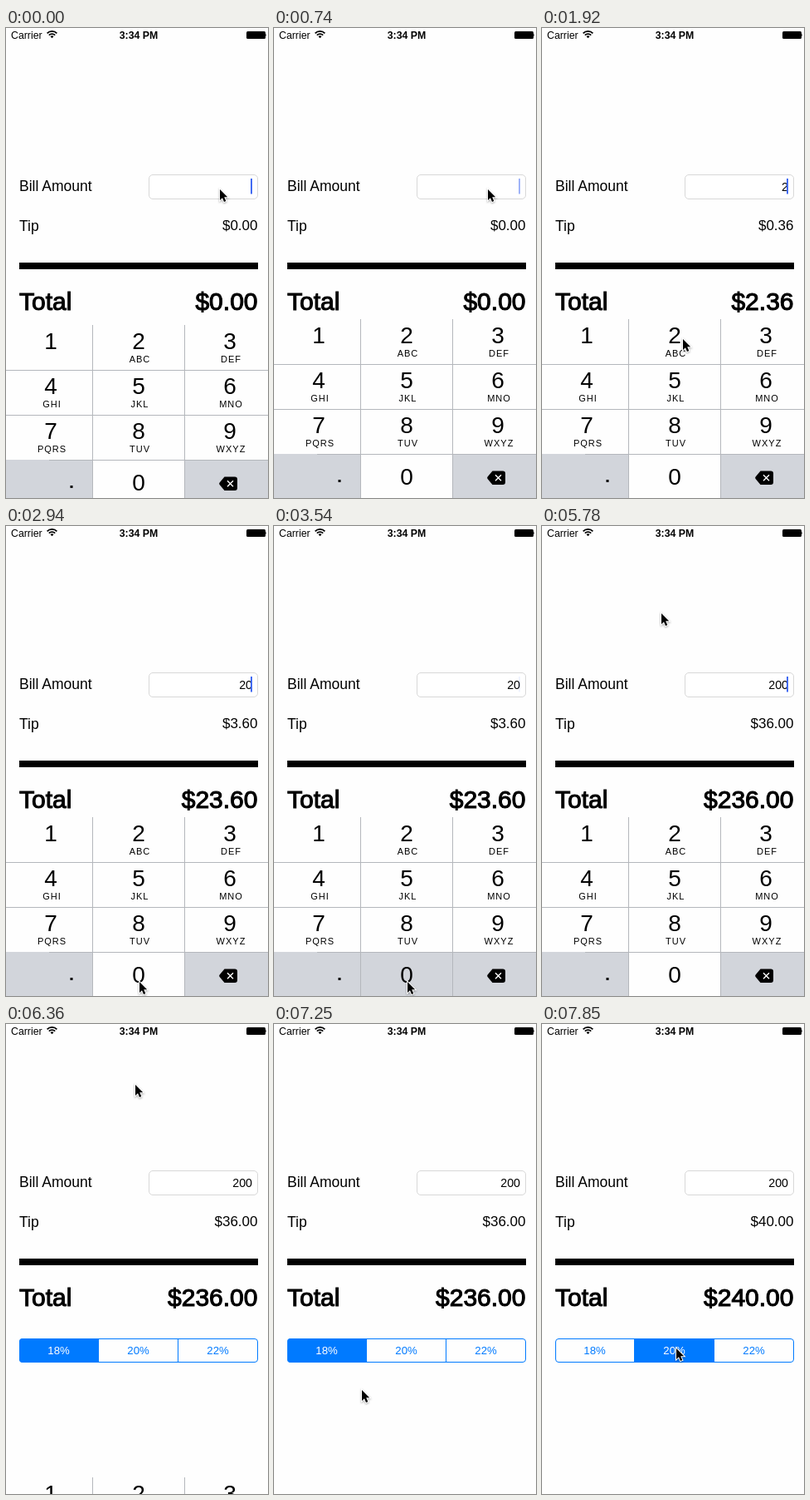
An HTML page that plays this animation: 316 by 565 pixels, repeating every 8 s.

```html
<!DOCTYPE html>
<html lang="en">
<head>
<meta charset="utf-8">
<title>Tip calculator</title>
<style>
  html, body { margin: 0; width: 100%; height: 100%; overflow: hidden; background: #fefefe; }
  svg { display: block; width: 100%; height: 100%; font-family: "Liberation Sans", Arial, sans-serif; }
  .label { font-size: 17.5px; }
  .money { font-size: 17px; text-anchor: end; }
  .total { font-size: 30px; stroke: #000; stroke-width: 1.1; }
  .end { text-anchor: end; }
  .status { font-size: 12.3px; }
  .digit { font-size: 28px; text-anchor: middle; }
  .letters { font-size: 11px; letter-spacing: 1px; text-anchor: middle; }
  .percent { font-size: 13.2px; text-anchor: middle; }
  .rule { stroke: #b4b7bc; }
</style>
</head>
<body>
<svg viewBox="0 0 316 565">
  <defs>
    <clipPath id="rounded"><rect x="16" y="378" width="288" height="29" rx="4"/></clipPath>
  </defs>

  <text class="status" x="6" y="12.6">Carrier</text>
  <g fill="none" stroke="#000" stroke-width="1.7">
    <path d="M49.6 6.3a8.2 8.2 0 0 1 11.8 0M51.8 8.6a5.2 5.2 0 0 1 7.4 0"/>
    <path d="M55.5 12.2l-2-2.1a2.9 2.9 0 0 1 4 0z" fill="#000" stroke="none"/>
  </g>
  <text class="status" x="160" y="12.6" text-anchor="middle" font-weight="bold">3:34 PM</text>
  <rect x="290" y="4" width="23" height="9" rx="1.5"/>
  <path d="M313.4 6.800q1.600 1.700 0 3.500z"/>

  <text class="label" x="16" y="196.300">Bill Amount</text>
  <rect x="172.5" y="176.5" width="131" height="29" rx="4.5" fill="#fff" stroke="#d8d8d8"/>
  <text id="bill" class="end" x="297" y="195.500" font-size="14.2"></text>
  <rect id="caret" x="295" y="181" width="2" height="18.500" fill="#426bf2"/>
  <text class="label" x="16" y="244.300">Tip</text>
  <text id="tip" class="money" x="303.5" y="243.400"></text>
  <rect x="16" y="282" width="288" height="8"/>
  <text class="total" x="16" y="339.300" font-size="30">Total</text>
  <text id="total" class="total end" x="303.5" y="339.300"></text>

  <g id="segments" clip-path="url(#rounded)"></g>
  <g fill="none" stroke="#007aff">
    <rect x="16.5" y="378.5" width="287" height="28" rx="3.5"/>
    <path d="M111.5 378v29M207.5 378v29"/>
  </g>

  <g id="keypad">
    <rect width="316" height="220" fill="#fefefe"/>
    <path d="M0 162h104v60H0zM216 162h100v60H216z" fill="#d2d5db"/>
    <rect id="pressed" x="105" width="110" height="54" fill="#d2d5db"/>
    <path class="rule" d="M104.5 0v220M215.5 0v220M0 54.5h316M0 108.5h316M52 162.5h264"/>
    <g id="keys"></g>
    <rect x="77.500" y="193" width="3" height="3"/>
    <path d="M263.5 182.5H276q3 0 3 3V196q0 3-3 3H263.5L257.6 192q-1-1.2 0-2.4z"/>
    <path d="M267 187.3l7 7M274 187.3l-7 7" stroke="#fff" stroke-width="1.4"/>
  </g>

  <path id="pointer" d="M0 0V13L3 10.200 5 15 7.300 14 5.200 9.300H9.200z"
        stroke="#fff" stroke-width="2" paint-order="stroke" style="filter: drop-shadow(0 1px 1px #0005)"/>
</svg>
<script>
const $ = id => document.getElementById(id);
const LOOP = 8000, STEP = 148;
const RATES = [18, 20, 22];
const BLUE = '#007aff';
const COLUMNS = [54, 160, 270];
const DISMISS = 6142, SELECT = 7800;

// Each key press is held from `down` to `up`; the digit appears on release.
const presses = [
  { down: 1760, up: 1920, top: 0, bill: '2' },
  { down: 2800, up: 2940, top: 163, bill: '20' },
  { down: 3540, up: 3660, top: 163, bill: '200' }
];

// Pointer waypoints: step, x, y.
const route = [
  [5, 258, 194], [6, 236, 255], [7, 190, 390], [8, 138, 477], [10, 170, 374],
  [13, 170, 374], [15, 165, 460], [16, 165, 460], [18, 161, 548],
  [31, 161, 548], [32, 158, 530], [33, 145, 460], [35, 98, 290], [36, 104, 220],
  [38, 132, 137], [40, 156, 73], [43, 156, 73], [45, 170, 300], [46, 176, 430],
  [47, 172, 545], [48, 125, 520], [49, 106, 440], [50, 162, 390]
];

function add(parent, tag, attributes, text = '') {
  const node = document.createElementNS('http://www.w3.org/2000/svg', tag);
  for (const name in attributes) node.setAttribute(name, attributes[name]);
  node.textContent = text;
  return parent.appendChild(node);
}

['', 'ABC', 'DEF', 'GHI', 'JKL', 'MNO', 'PQRS', 'TUV', 'WXYZ'].forEach((letters, i) => {
  const x = COLUMNS[i % 3], y = 29.3 + 54 * Math.floor(i / 3);
  add($('keys'), 'text', { class: 'digit', x, y }, i + 1);
  add($('keys'), 'text', { class: 'letters', x: x + 1.5, y: y + 15.5 }, letters);
});
add($('keys'), 'text', { class: 'digit', x: 160, y: 199.3 }, 0);

const segments = RATES.map((rate, i) => ({
  fill: add($('segments'), 'rect', { x: 16 + 96 * i, y: 378, width: 96, height: 29, fill: BLUE }),
  text: add($('segments'), 'text', { class: 'percent', x: 63.5 + 96 * i, y: 397 }, rate + '%')
}));

function pointerAt(step) {
  const next = route.findIndex(point => point[0] > step);
  if (next === 0) return route[0].slice(1);
  if (next < 0) return route[route.length - 1].slice(1);
  const [s0, x0, y0] = route[next - 1], [s1, x1, y1] = route[next];
  const f = (step - s0) / (s1 - s0);
  return [x0 + (x1 - x0) * f, y0 + (y1 - y0) * f];
}

function caretOpacity(age) {
  if (age < 465) return 1;
  const phase = (age - 465) % 1000;
  if (phase < 160) return 1 - phase / 160;
  return Math.min(1, Math.max(0, (phase - 415) / 200));
}

// Distance still to travel in a critically damped spring, from 1 to 0.
function springLeft(ms) {
  const x = 0.018 * Math.max(0, ms);
  return (1 + x) * Math.exp(-x);
}

function draw(now) {
  const step = Math.floor((now % LOOP + 20) / STEP);
  const t = step * STEP;

  const typed = presses.filter(press => t >= press.up).pop();
  const bill = typed ? typed.bill : '';
  const selected = t >= SELECT ? 1 : 0;
  const tip = bill * RATES[selected] / 100;
  $('bill').textContent = bill;
  $('tip').textContent = '$' + tip.toFixed(2);
  $('total').textContent = '$' + (+bill + tip).toFixed(2);
  $('caret').setAttribute('opacity', t < DISMISS ? caretOpacity(t - (typed ? typed.up : -240)) : 0);

  segments.forEach(({ fill, text }, i) => {
    const touched = i === 1 && t >= 7690;
    fill.setAttribute('opacity', i === selected ? 1 : touched && !selected ? 0.15 : 0);
    text.setAttribute('fill', i === selected ? '#fff' : BLUE);
  });

  const held = presses.find(press => t >= press.down && t < press.up);
  $('pressed').setAttribute('opacity', held ? 1 : 0);
  if (held) $('pressed').setAttribute('y', held.top);

  const drop = t < DISMISS ? springLeft(t + 289) : 1 - springLeft(t - DISMISS);
  $('keypad').setAttribute('transform', `translate(0 ${350 + Math.round(215 * drop)})`);
  $('pointer').setAttribute('transform', `translate(${pointerAt(step)})`);
}

const start = performance.now();
function tick() {
  draw(performance.now() - start);
  requestAnimationFrame(tick);
}
tick();
</script>
</body>
</html>
```
